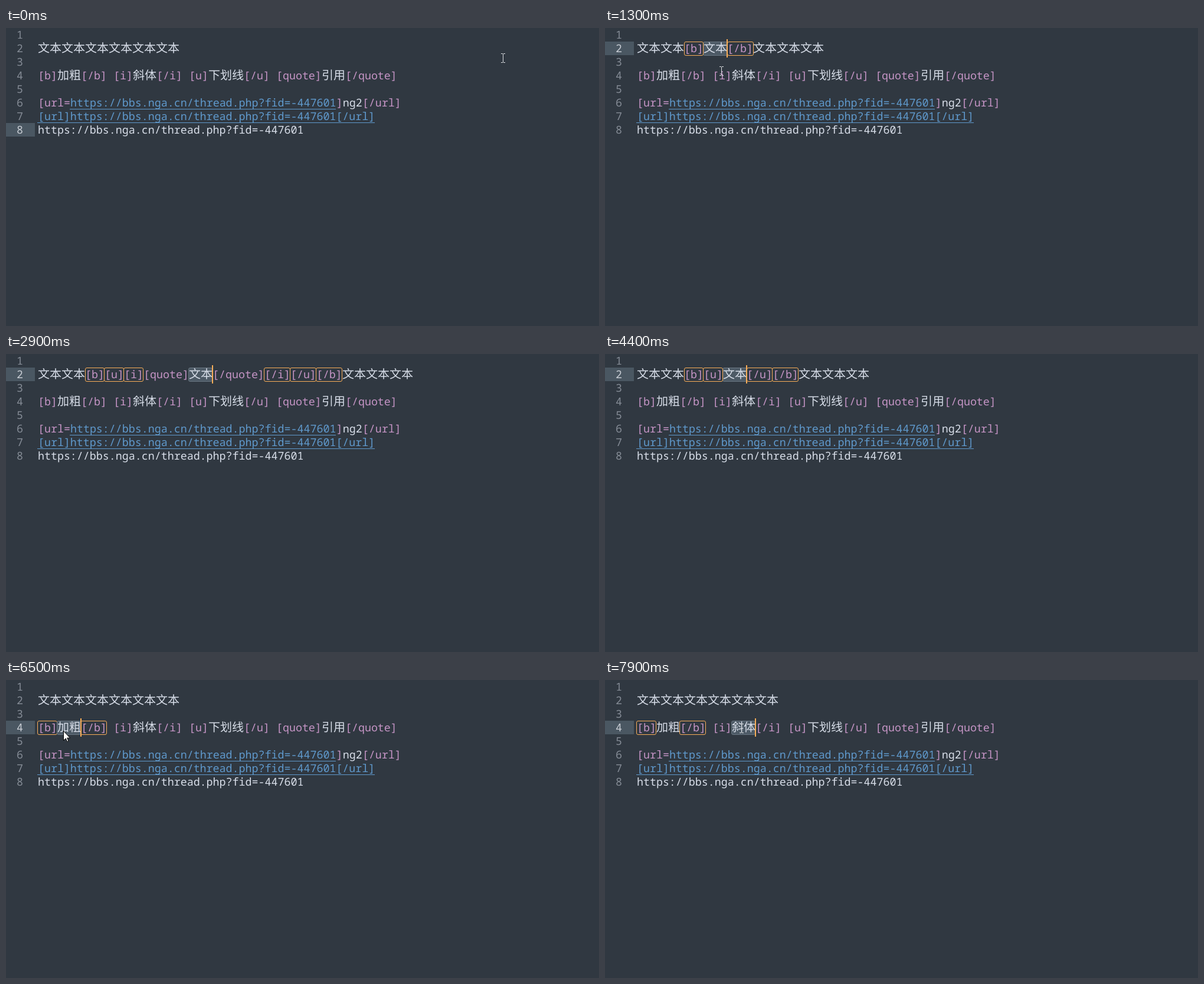
Write an HTML page that moves like this. It is 1005 px wide and 505 px high and loops after 8 s.

```html
<!DOCTYPE html>
<html lang="zh">
<head>
<meta charset="utf-8">
<title>BBCode editor</title>
<style>
  html, body { margin: 0; width: 100%; height: 100%; overflow: hidden; background: #303841; }
  svg { display: block; width: 1005px; height: 505px; }
  text { font: 18.327px "Noto Sans Mono", "DejaVu Sans Mono", monospace; fill: #d8dee9; text-rendering: geometricPrecision; }
  text.cjk { font: 300 20px "Noto Sans CJK SC", "Noto Sans CJK", sans-serif; letter-spacing: .013px; }
  text.tag { fill: #c695c6; }
  text.url { fill: #5f99cc; }
  text.num { fill: #848b95; text-anchor: end; }
  text.on { fill: #c8cdd4; }
  .line { fill: #5f99cc; }
  .gutter { fill: #4a5762; }
  .sel { fill: #4d5a66; stroke: #687581; }
  .box { fill: none; stroke: #f9ae58; }
  .caret { fill: #f9ae58; }
  .beam { fill: none; stroke: #dcdfe2; }
  .arrow { fill: #fff; stroke: #000; stroke-linejoin: round; }
</style>
</head>
<body>
<svg viewBox="0 0 1005 505">
  <g id="under"></g>
  <g id="fixed"></g>
  <g id="live"></g>
</svg>
<script>
(() => {
  const LOOP = 8000, STEP = 100, ROW = 23, LEFT = 53.95;
  const LINK = 'https://bbs.nga.cn/thread.php?fid=-447601';
  const TAGS = ['b', 'u', 'i', 'quote'];

  const rowTop = row => (row - 1) * ROW;
  const isWide = s => s.charCodeAt(0) > 127;
  const width = s => [...s].reduce((w, c) => w + (isWide(c) ? 20.013 : 10.996), 0);

  const label = (s, x, row, cls = '') =>
    `<text class="${cls}" x="${x}" y="${rowTop(row) + 18}">${s}</text>`;

  // Lays out [text, class] pairs one after another.
  function runs(row, parts) {
    let x = LEFT, out = '';
    for (const [s, cls] of parts) {
      if (s.trim()) out += label(s, x, row, cls);
      if (cls === 'url') {
        out += `<rect class="line" x="${Math.floor(x)}" y="${rowTop(row) + 22}" width="${Math.ceil(width(s))}" height="1"/>`;
      }
      x += width(s);
    }
    return out;
  }

  const markup = (row, s) => runs(row, s.match(/\[[^\]]*\]|[^\x00-\x7f]+|[^[\s]+|\s/g)
    .map(p => [p, p[0] === '[' ? 'tag' : isWide(p) ? 'cjk' : '']));

  function outline(row, x0, x1, cls) {
    const a = Math.floor(x0), b = Math.ceil(x1);
    return `<rect class="${cls}" x="${a + .5}" y="${rowTop(row) + .5}" width="${b - a - 1}" height="${ROW}" rx="2.5"/>`;
  }

  const caret = (row, x) =>
    `<rect class="caret" x="${Math.round(x) - 1}" y="${rowTop(row) - 4}" width="2" height="31"/>`;

  // Value of the last entry whose time has come.
  const at = (list, t) => list.filter(e => e[0] <= t).pop()[1];

  const DEPTH = [[-1e4, 0], [1100, 1], [1900, 2], [2300, 3], [2900, 4], [3700, 3], [4400, 2], [4900, 1], [5400, 0]];
  const BOLD = [[0, true], [6800, false], [7300, true]];
  const BOLD_BOX = [[0, false], [6500, true], [6800, false], [7500, true]];

  const POINTER = [
    [0, 842, 51], [100, 775, 53], [300, 430, 50], [500, 160, 40], [600, 134, 36], [800, 174, 38],
    [1000, 180, 46], [1300, 197, 73], [1900, 197, 73],
    [5700, 192, 74], [6000, 112, 83], [6200, 97, 86], [6500, 97, 86],
    [7400, 112, 82], [7500, 122, 82], [7700, 228, 82], [7800, 231, 82], [8000, 231, 82]
  ];

  function pointer(t) {
    if (t >= 1900 && t < 5700) return '';
    const i = POINTER.findIndex(p => p[0] > t);
    const [t0, x0, y0] = POINTER[i - 1], [t1, x1, y1] = POINTER[i];
    const k = (t - t0) / (t1 - t0);
    const x = Math.round(x0 + (x1 - x0) * k), y = Math.round(y0 + (y1 - y0) * k);
    const overSelection = (t >= 6500 && t < 6800) || (t >= 7300 && t < 7600);
    return overSelection
      ? `<path class="arrow" transform="translate(${x} ${y})" d="M.5 .5V16.5L4.2 13L6.7 18.5L9 17.5L6.6 12.2H11.6Z"/>`
      : `<path class="beam" transform="translate(${x} ${y})" d="M-3 -7.5H0M1 -7.5H4M.5 -7V7M-3 7.5H0M1 7.5H4"/>`;
  }

  function secondLine(t) {
    const depth = at(DEPTH, t);
    const boxed = Math.min(depth, at(DEPTH, t - 200));
    const names = TAGS.slice(0, depth);
    const head = names.map(n => `[${n}]`).join('');
    const tail = names.map(n => `[/${n}]`).reverse().join('');
    const start = LEFT + width('文本文本' + head), end = start + width('文本');
    let under = '', over = markup(2, '文本文本' + head + '文本' + tail + '文本文本文本');

    if (t >= 600 && t < 6300) {
      const x = t < 700 ? start : t < 800 ? (start + end) / 2 : end;
      if (x > start) under += outline(2, start, x, 'sel');
      over += caret(2, x);
    }
    let a = LEFT + width('文本文本'), b = end + width(tail);
    names.slice(0, boxed).forEach(n => {
      const w = width(`[${n}]`), v = width(`[/${n}]`);
      under += outline(2, a, a + w, 'box') + outline(2, b - v, b, 'box');
      a += w;
      b -= v;
    });
    return [under, over];
  }

  function fourthLine(t) {
    const bold = at(BOLD, t);
    const head = bold ? '[b]加粗[/b]' : '加粗';
    const start = LEFT + (bold ? width('[b]') : 0), end = start + width('加粗');
    const italic = LEFT + width(head + ' [i]'), italicEnd = italic + width('斜体');
    let under = '', over = markup(4, head + ' [i]斜体[/i] [u]下划线[/u] [quote]引用[/quote]');

    if (at(BOLD_BOX, t)) {
      under += outline(4, LEFT, start, 'box') + outline(4, end, end + width('[/b]'), 'box');
    }
    if (t >= 7900) {
      under += outline(4, italic, italicEnd, 'sel');
      over += caret(4, italicEnd);
    } else if (t >= 7800) {
      over += caret(4, (italic + italicEnd) / 2);
    } else if (t >= 6400) {
      under += outline(4, start, end, 'sel');
      over += caret(4, end);
    } else if (t >= 6300) {
      over += caret(4, (start + end) / 2);
    }
    return [under, over];
  }

  function gutter(active) {
    let out = '';
    for (let n = 1; n <= 8; n++) out += label(n, 29, n, n === active ? 'num on' : 'num');
    return out;
  }

  const [underEl, fixedEl, liveEl] = ['under', 'fixed', 'live'].map(id => document.getElementById(id));

  fixedEl.innerHTML =
    runs(6, [['[url=', 'tag'], [LINK, 'url'], [']', 'tag'], ['ng2', ''], ['[/url]', 'tag']]) +
    runs(7, [[`[url]${LINK}[/url]`, 'url']]) +
    runs(8, [[LINK, '']]);

  function draw(t) {
    const active = t < 600 ? 8 : t < 6300 ? 2 : 4;
    const [under2, over2] = secondLine(t);
    const [under4, over4] = fourthLine(t);
    underEl.innerHTML = `<rect class="gutter" y="${rowTop(active)}" width="49" height="${ROW}"/>` + under2 + under4;
    liveEl.innerHTML = gutter(active) + over2 + over4 + pointer(t);
  }

  const begin = performance.now();
  let shown = -1;

  function tick() {
    const t = Math.floor((performance.now() - begin) % LOOP / STEP) * STEP;
    if (t !== shown) draw(shown = t);
    requestAnimationFrame(tick);
  }
  tick();
})();
</script>
</body>
</html>
```
